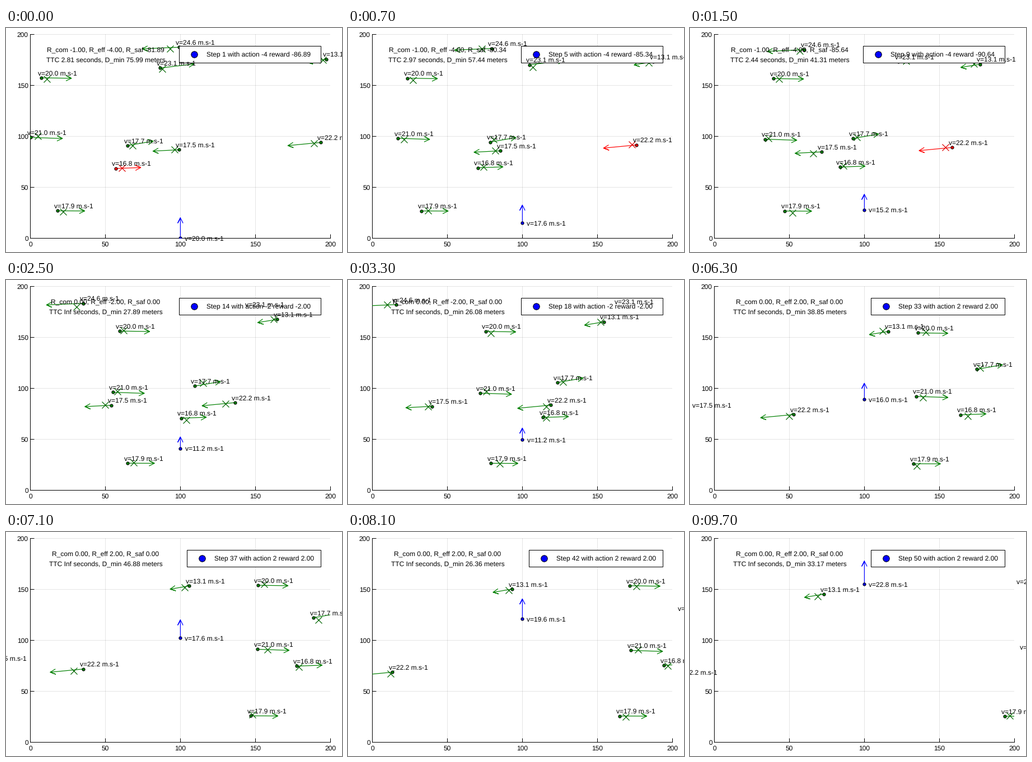
Recreate the animation shown at these times as a matplotlib script. Size 600 px wide and 400 px high, loop 9.9 s.

```python
import numpy as np
import matplotlib.pyplot as plt
from matplotlib.animation import FuncAnimation
from matplotlib.patches import Rectangle

PT = 0.72                         # points per pixel at 100 dpi
X0, Y0 = 43.4, 375.4              # plot origin in pixels
SCALE = np.array([2.68, 1.82])    # pixels per metre
DT, STEPS = 0.2, 50
SAFE = 15.06                      # collision radius, metres

# each car drives straight on: start x, y and velocity x, y
CARS = np.array([
    (197.35, 175.675, -12.7, -3.1025),
    (18.3, 26.9, 17.88, -0.14),
    (7.3, 157.4, 20.04, -0.47),
    (0.4, 98.9, 20.977, -1.07),
    (193.6915, 93.975, -21.9953, -3.08),
    (56.7946, 68.4496, 16.778, 0.86659),
    (64.7, 90.9, 17.2, 4.34),
    (99.25, 86.8, -17.45, -1.32),
    (99.2, 187.4, -24.55, -1.55),
    (86.4, 167.0, 22.74, 3.96),
])
POS, VEL = CARS[:, :2], CARS[:, 2:]

# brake in pulses, brake hard, coast, then speed up
ACTIONS = [-4, -4, -2, -2] * 2 + [-4] * 5 + [-2, 0, 0, 2, -2, 0]
ACTIONS += [2] * (STEPS - len(ACTIONS))


def time_to_collision(p, v):
    """Time until |p + v t| shrinks to the safe radius."""
    speed2 = v @ v
    closest = -(p @ v) / speed2
    room = SAFE ** 2 - (p[0] * v[1] - p[1] * v[0]) ** 2 / speed2
    if closest <= 0 or room < 0:
        return np.inf
    return closest - np.sqrt(room / speed2)


def simulate():
    rng = np.random.default_rng(7)
    y, v, log = 0.0, 20.0, []
    for k, a in enumerate(ACTIONS):
        now, then = POS + VEL * DT * k, POS + VEL * DT * (k + 1)
        y2, v2 = y + v * DT + a * DT ** 2 / 2, v + a * DT
        rel = then - [100, y2]
        ttc = [time_to_collision(p, u) for p, u in zip(rel, VEL - [0, v2])]
        log.append(dict(
            y=y, v=v, a=a, pos=now, ttc=min(ttc),
            seen=np.rint(then + rng.normal(0, 1.3, then.shape)),
            threat=int(np.argmin(ttc)) if np.isfinite(min(ttc)) else -1,
            dist=np.hypot(*rel.T).min()))
        y, v = y2, v2
    return log


LOG = simulate()

plt.rcParams.update({"font.family": "Liberation Sans", "font.size": 12 * PT,
                     "text.hinting": "none"})
fig = plt.figure(figsize=(6, 4), dpi=100, facecolor="white")
ax = fig.add_axes([X0 / 600, 1 - Y0 / 400, 536 / 600, 364 / 400])
ax.set(xlim=(0, 200), ylim=(0, 200),
       xticks=range(0, 201, 50), yticks=range(0, 201, 50))
ax.set_axisbelow(True)
ax.grid(color="black", alpha=0.1, lw=PT)
ax.tick_params(direction="in", length=7 * PT, width=PT)
ax.tick_params(axis="x", pad=5.6 * PT)
ax.tick_params(axis="y", pad=3.6 * PT)
for side in ("top", "right"):
    ax.spines[side].set_visible(False)
for side in ("left", "bottom"):
    ax.spines[side].set_linewidth(PT)


def to_data(px, py):
    return (px - X0) / SCALE[0], (Y0 - py) / SCALE[1]


def text(ha="center"):
    return ax.text(0, 0, "", ha=ha, va="baseline", zorder=6)


def put(label, x, y, s):
    """Place text with its capitals centred on the height y."""
    label.set_position((x, y - 4.6 / SCALE[1]))
    label.set_text(s)


def arrow_path(start, vel):
    tip = start + vel
    u = vel * SCALE
    u = u / np.hypot(*u)
    n = np.array([-u[1], u[0]])
    barbs = [tip + (-9 * u + s * 4.5 * n) / SCALE for s in (1, -1)]
    return np.array([start, tip, barbs[0], tip, barbs[1]]).T


class Vehicle:
    def __init__(self, label_shift):
        self.shift = np.array(label_shift)
        self.arrow, = ax.plot([], [], lw=1.2 * PT, zorder=3,
                              solid_joinstyle="round")
        self.cross, = ax.plot([], [], "x", ms=12 * PT, mew=1.2 * PT, zorder=3)
        self.dot, = ax.plot([], [], "o", ms=5.2 * PT, mec="black",
                            mew=PT, zorder=4)
        self.label = text()

    def show(self, pos, vel, color, seen=None, cross_color=None):
        self.arrow.set_data(*arrow_path(pos, vel))
        self.arrow.set_color(color)
        self.dot.set_data([pos[0]], [pos[1]])
        self.dot.set_markerfacecolor(color)
        if seen is not None:
            self.cross.set_data([seen[0]], [seen[1]])
            self.cross.set_color(cross_color)
        put(self.label, *(pos + self.shift), f"v={np.hypot(*vel):.1f} m.s-1")


cars = [Vehicle((10.7, 5)) for _ in CARS]
ego = Vehicle((15.9, 0))
rewards, safety = text(), text()

box = Rectangle(to_data(0, 62), 1, 30 / SCALE[1], fc="white", ec="black",
                lw=PT, zorder=5)
ax.add_patch(box)
key, = ax.plot([], [], "o", ms=11.5 * PT, mfc="blue", mec="black", mew=PT,
               zorder=6)
caption = text("left")


def update(frame):
    k = (frame + 1) // 2
    s = LOG[k]
    for i, car in enumerate(cars):
        danger = i == s["threat"]
        car.show(s["pos"][i], VEL[i], "red" if danger else "green",
                 s["seen"][i], "#dd0000" if danger else "#006400")
    ego.show(np.array([100, s["y"]]), np.array([0, s["v"]]), "blue")

    comfort = -1.0 if s["a"] == -4 else 0.0
    safe, ttc = 0.0, "Inf"
    if np.isfinite(s["ttc"]):
        safe, ttc = 10 * s["ttc"] - 110, f"{s['ttc']:.2f}"
    total = comfort + s["a"] + safe
    put(rewards, 50.2, 185,
        f"R_com {comfort:.2f}, R_eff {s['a']:.2f}, R_saf {safe:.2f}")
    put(safety, 50.2, 175, f"TTC {ttc} seconds, D_min {s['dist']:.2f} meters")

    line = f"Step {k + 1} with action {s['a']} reward {total:.2f}"
    width = 7 * len(line) + 8
    left = 562 - width
    box.set_x(to_data(left, 0)[0])
    box.set_width(width / SCALE[0])
    x, y = to_data(left + 27, 47.2)
    key.set_data([x], [y])
    put(caption, *to_data(left + 49, 47.2), line)
    return []


anim = FuncAnimation(fig, update, frames=2 * STEPS - 1, interval=100,
                     init_func=lambda: update(0), repeat=True, repeat_delay=0)
plt.show()
```
